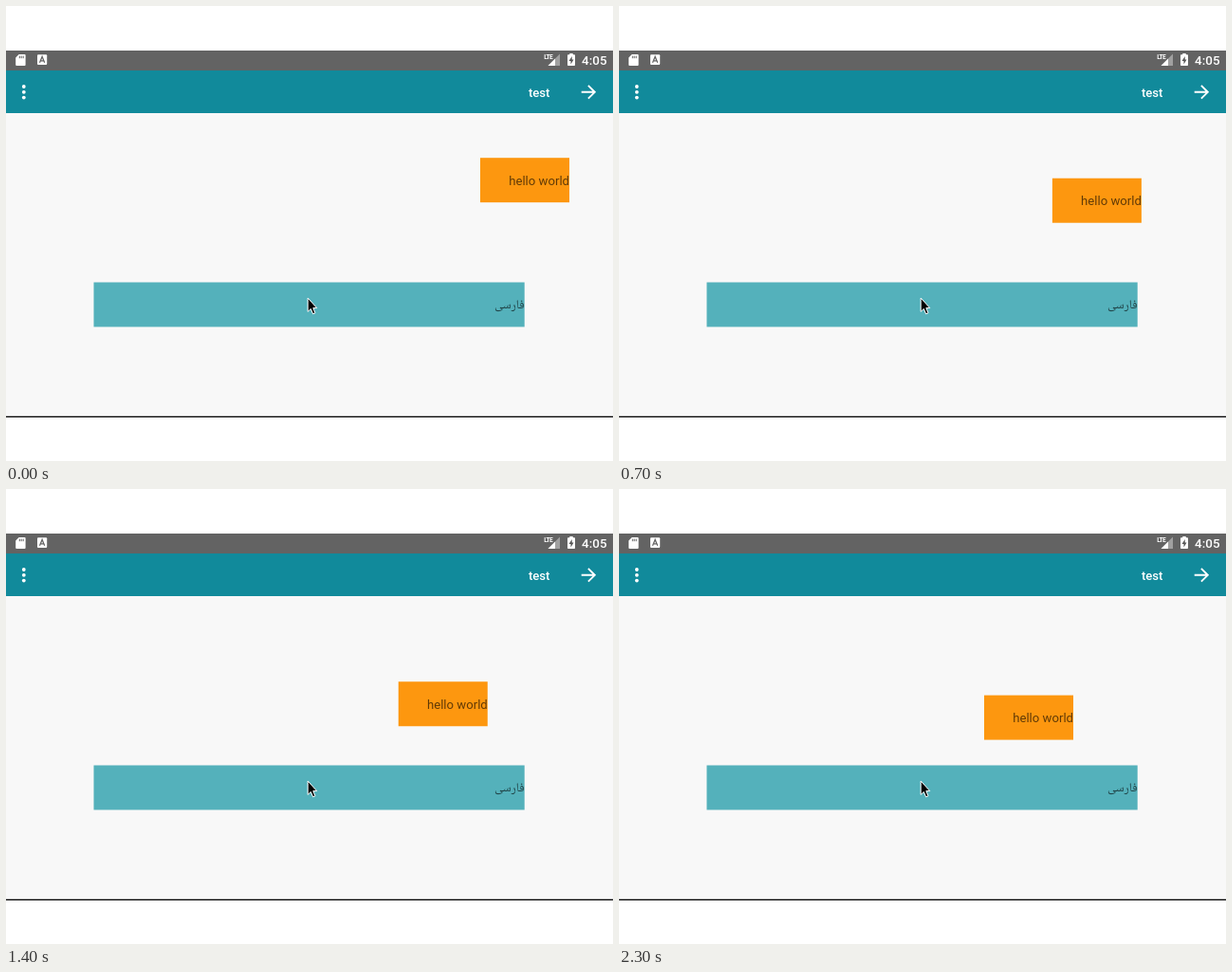
These frames come from a looping animation (640x480 px, 2.4 s). An HTML page:

```html
<!DOCTYPE html>
<html lang="en">
<head>
<meta charset="utf-8">
<title>Sliding box</title>
<style>
  html, body { margin: 0; width: 100%; height: 100%; overflow: hidden; background: #fff; }
  svg { display: block; width: 640px; height: 480px; }
  text { font: 13.15px Roboto, sans-serif; }
  .bar { font-weight: 500; fill: #fff; }
  .label { fill: #000; fill-opacity: .62; }
  .fa { font-family: "Noto Naskh Arabic", "Noto Sans Arabic", "DejaVu Sans", sans-serif; }
</style>
</head>
<body>
<svg viewBox="0 0 640 480">
  <rect y="47" width="640" height="386" fill="#f8f8f8"/>
  <rect y="432.7" width="640" height="1.3" fill="#000"/>

  <!-- status bar -->
  <rect y="47" width="640" height="21.3" fill="#636363"/>
  <path d="M13.6 51H19.6Q20.6 51 20.6 52V62Q20.6 63 19.6 63H11.2Q10.2 63 10.2 62V54.4Z" fill="#fff"/>
  <path d="M14.3 52.6v2.6M16.2 52.6v2.6M18.2 52.6v2.6" stroke="#636363"/>
  <rect x="33" y="51.3" width="10.2" height="10.6" rx="1" fill="#fff"/>
  <path d="M35.5 59.8L38.1 53.4L40.7 59.8M36.4 57.9H39.8" fill="none" stroke="#636363" stroke-width="1.2"/>
  <path d="M571.5 63L584 50.5V63Z" fill="#a0a0a0"/>
  <path d="M571.5 63L579 55.5V63Z" fill="#fff"/>
  <text x="567.3" y="56" fill="#fff" style="font-size:6.6px;font-weight:700;letter-spacing:-.7px">LTE</text>
  <path d="M594.3 51.2V50H597.7V51.2H599.2Q600 51.2 600 52V62.2Q600 63 599.2 63H592.8Q592 63 592 62.2V52Q592 51.2 592.8 51.2Z" fill="#fff"/>
  <path d="M596.7 53L593.6 57.9H595.5V61.4L598.5 56.4H596.7Z" fill="#555"/>
  <text class="bar" x="633.5" y="62" text-anchor="end" style="font-size:13.4px">4:05</text>

  <!-- toolbar -->
  <rect y="68" width="640" height="45" fill="#118a9b"/>
  <g fill="#fff">
    <circle cx="18.8" cy="85" r="1.9"/>
    <circle cx="18.8" cy="90.8" r="1.9"/>
    <circle cx="18.8" cy="96.6" r="1.9"/>
  </g>
  <text class="bar" x="573.5" y="95.6" text-anchor="end">test</text>
  <path d="M606.7 90.8H620.5M613.9 83.9L620.8 90.8L613.9 97.7" fill="none" stroke="#fff" stroke-width="1.9"/>

  <!-- content -->
  <rect x="92.5" y="291.5" width="454.2" height="47" fill="#54b1bb"/>
  <text class="label fa" x="546.7" y="319" text-anchor="end">فارسی</text>
  <g id="box">
    <rect width="94" height="47" fill="#fd970f"/>
    <text class="label" x="94" y="28.6" text-anchor="end">hello world</text>
  </g>
  <path d="M318.2 308V322.4L321.4 319.5L323.6 324.8L326 323.8L323.8 318.6H327.8Z"
    fill="#000" stroke="#fff" stroke-width="1" stroke-linejoin="round"/>
</svg>
<script>
  const LOOP = 2400, FRAME = 100, TICK = 111, LEAD = 24, STEPS = 16;
  const box = document.getElementById("box");

  // The box advances one step per tick, shown at the frame rate, then rests.
  function draw(now) {
    const t = Math.floor(now % LOOP / FRAME) * FRAME;
    const k = Math.min(STEPS, Math.floor((t + LEAD) / TICK)) / STEPS;
    box.setAttribute("transform", `translate(${500 - 115 * k} ${160.2 + 57.4 * k})`);
  }

  const start = performance.now();
  function loop() {
    draw(performance.now() - start);
    requestAnimationFrame(loop);
  }
  loop();
</script>
</body>
</html>
```
